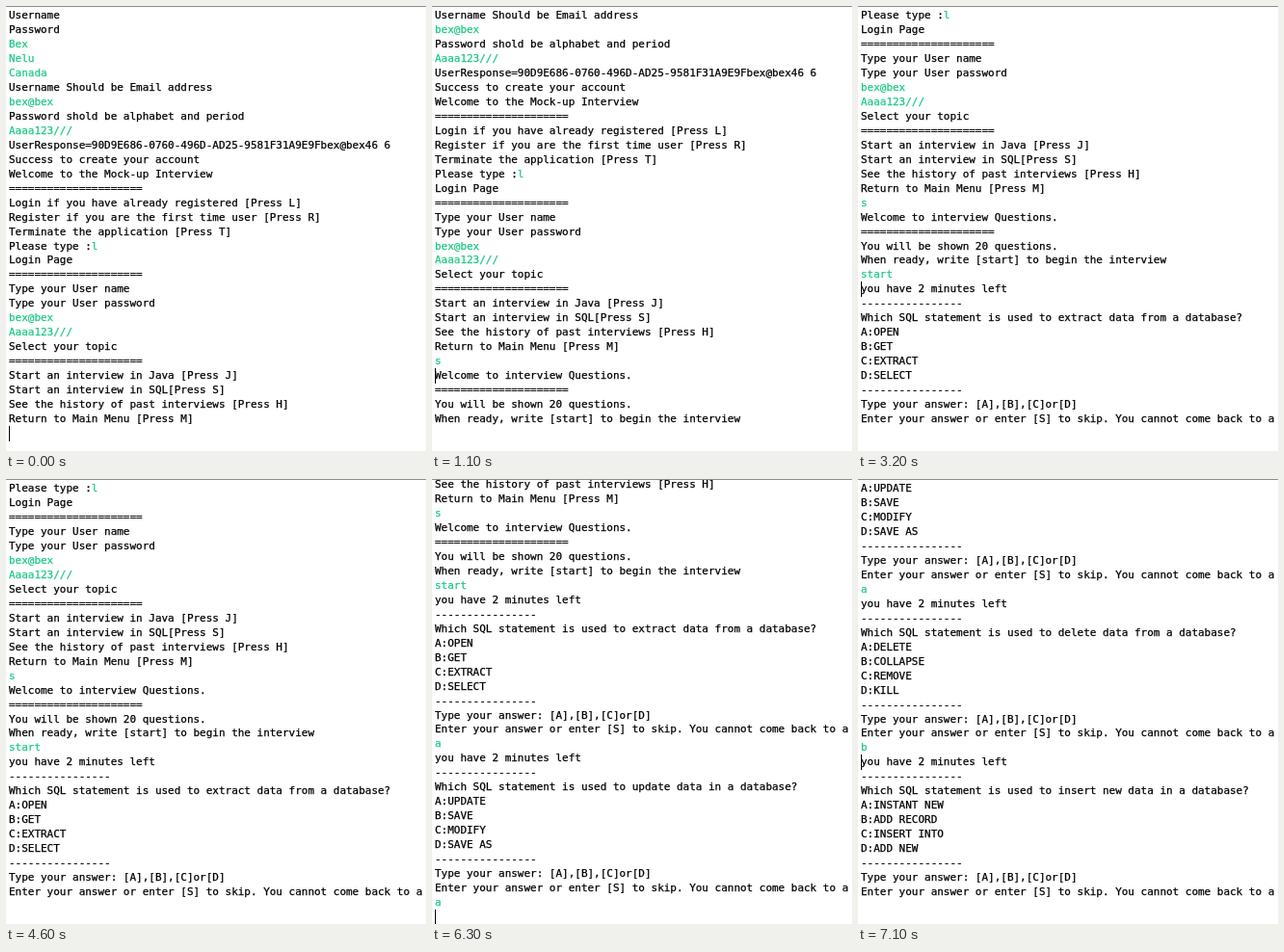
An HTML page that plays this animation: 436 px wide and 462 px high, repeating every 7.2 s.

```html
<!DOCTYPE html>
<html lang="en">
<head>
<meta charset="utf-8">
<style>
  html, body { margin: 0; width: 436px; height: 462px; overflow: hidden; background: #fff; }
  #view { position: absolute; inset: 0; overflow: hidden; border-top: 1px solid #8c8c8c; }
  pre { position: absolute; left: 3px; top: 2px; margin: 0; color: #000;
        font: 10.97px/14.965px "DejaVu Sans Mono", monospace; -webkit-text-stroke: 0.25px; }
  b { font-weight: normal; color: #1cc885; }
  #caret { position: absolute; top: 1px; left: 3px; width: 1px; height: 16px; background: #000; }
</style>
</head>
<body>
<div id="view"><pre id="log"></pre><div id="caret"></div></div>
<script>
const ROW = 14.965, COL = 6.604, PROMPT_ROW = 29;
const LOOP = 7200, BLINK = 500, KEY_DELAY = 120, ENTER_DELAY = 200, REPLY_DELAY = 100;
const rule = '='.repeat(21), dash = '-'.repeat(16);

const question = (text, options, answer) => [
  'you have 2 minutes left', dash,
  `Which SQL statement is used to ${text} a database?`,
  ...options.map((option, i) => 'ABCD'[i] + ':' + option), dash,
  'Type your answer: [A],[B],[C]or[D]',
  'Enter your answer or enter [S] to skip. You cannot come back to a',
  '~' + answer
];

// Text after "~" was typed by the user and is shown in green.
const lines = [
  'Username', 'Password', '~Bex', '~Nelu', '~Canada',
  'Username Should be Email address', '~bex@bex',
  'Password shold be alphabet and period', '~Aaaa123///',
  'UserResponse=90D9E686-0760-496D-AD25-9581F31A9E9Fbex@bex46 6',
  'Success to create your account',
  'Welcome to the Mock-up Interview', rule,
  'Login if you have already registered [Press L]',
  'Register if you are the first time user [Press R]',
  'Terminate the application [Press T]',
  'Please type :~l', 'Login Page', rule,
  'Type your User name', 'Type your User password', '~bex@bex', '~Aaaa123///',
  'Select your topic', rule,
  'Start an interview in Java [Press J]',
  'Start an interview in SQL[Press S]',
  'See the history of past interviews [Press H]',
  'Return to Main Menu [Press M]', '~s',
  'Welcome to interview Questions.', rule,
  'You will be shown 20 questions.',
  'When ready, write [start] to begin the interview', '~start',
  ...question('extract data from', ['OPEN', 'GET', 'EXTRACT', 'SELECT'], 'a'),
  ...question('update data in', ['UPDATE', 'SAVE', 'MODIFY', 'SAVE AS'], 'a'),
  ...question('delete data from', ['DELETE', 'COLLAPSE', 'REMOVE', 'KILL'], 'b'),
  ...question('insert new data in', ['INSTANT NEW', 'ADD RECORD', 'INSERT INTO', 'ADD NEW'], '')
];

// One turn per live prompt: when the caret moves there and when Enter is pressed.
const turns = [
  { focus: -400, enter: 700 },
  { focus: 2000, enter: 3000 },
  { focus: 4100, enter: 5400 },
  { focus: 6200, enter: 6300 },
  { focus: 6800, enter: 6900 },
  { focus: LOOP, enter: LOOP }
];
const prompts = [...lines.keys()].filter(i => i >= PROMPT_ROW && lines[i][0] === '~');

const log = document.getElementById('log'), caret = document.getElementById('caret');
const markup = line => line.replace(/~(.*)/, '<b>$1</b>');

function typedLength(answer, { focus, enter }, time) {
  const start = Math.max(focus, enter - ENTER_DELAY - (answer.length - 1) * KEY_DELAY);
  const keys = Math.floor((time - start) / KEY_DELAY) + 1;
  return Math.max(0, Math.min(answer.length, keys));
}

function caretState(i, time) {
  const { focus, enter } = turns[i];
  if (time >= enter) return { line: prompts[i] + 1, since: enter };
  if (time >= focus) return { line: prompts[i], since: focus };
  return { line: prompts[i - 1] + 1, since: turns[i - 1].enter + REPLY_DELAY };
}

function render(time) {
  const i = turns.findIndex(turn => time < turn.enter + REPLY_DELAY);
  const prompt = prompts[i], first = prompt - PROMPT_ROW;
  const typed = typedLength(lines[prompt].slice(1), turns[i], time);
  const { line, since } = caretState(i, time);

  const rows = [...lines.slice(first, prompt), lines[prompt].slice(0, typed + 1)];
  log.innerHTML = rows.map(markup).join('\n');

  const nudge = line > prompt ? -4 : 0; // keeps a fresh line inside the view
  const x = Math.round(line === prompt ? typed * COL : 0);
  const y = Math.round((line - first) * ROW) + nudge;
  log.style.transform = `translateY(${nudge}px)`;
  caret.style.transform = `translate(${x}px, ${y}px)`;
  caret.hidden = Math.floor((time - since) / BLINK) % 2 === 1;
}

function tick() {
  render(performance.now() % LOOP);
  requestAnimationFrame(tick);
}
tick();
</script>
</body>
</html>
```
